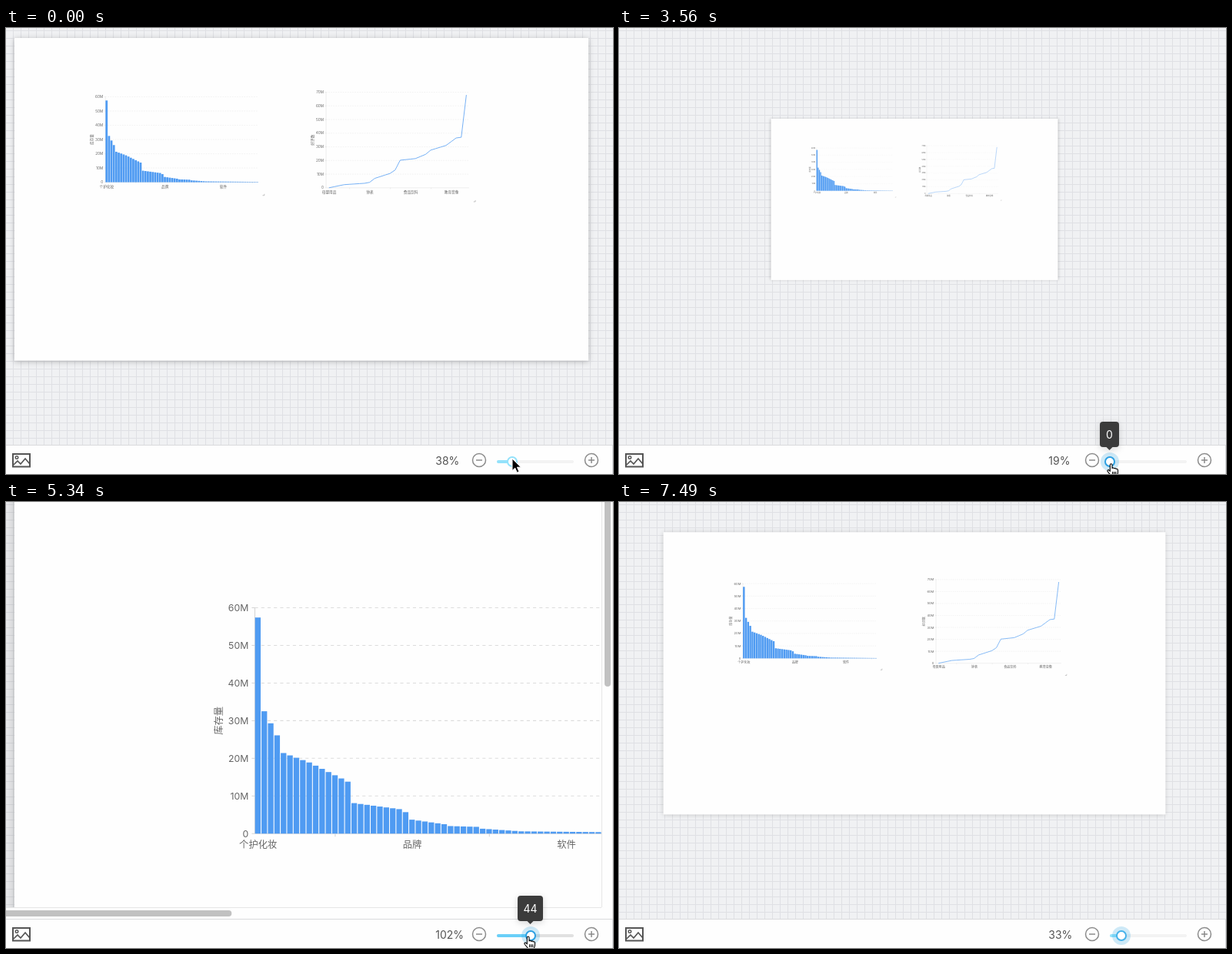
Write an HTML page that moves like this. It is 789 by 580 pixels and loops after 8000 ms.

```html
<!DOCTYPE html>
<html lang="zh">
<head>
<meta charset="utf-8">
<title>Canvas zoom</title>
<style>
html, body { margin: 0; width: 100%; height: 100%; overflow: hidden; background: #fff; }
body { font-family: Inter, "Noto Sans CJK SC", "Noto Sans CJK", sans-serif; }
#stage { position: relative; width: 789px; height: 580px; overflow: hidden; background: #fefefe; }
#view {
  position: absolute; left: 0; top: 0; width: 789px; height: 542px; overflow: hidden;
  background-color: #f0f1f3;
  background-image: linear-gradient(90deg, #dfe0e4 1px, transparent 1px), linear-gradient(#dfe0e4 1px, transparent 1px);
  background-size: 10px 10px; background-position: 9px 3px;
}
#page {
  position: absolute; left: 0; top: 0; width: 1920px; height: 1080px;
  transform-origin: 0 0; background: #fefefe; box-shadow: 0 3px 18px rgba(0, 0, 0, .24);
}
#page svg, #ui { position: absolute; left: 0; top: 0; }
#page text { font-size: 12px; fill: #666; }
.grid { stroke: #dcdcdc; stroke-dasharray: 4 4; }
.axis { stroke: #d4d4d4; }
#ui text { font-size: 14px; }
#tip { filter: drop-shadow(0 2px 4px rgba(0, 0, 0, .16)); }
</style>
</head>
<body>
<div id="stage">
  <div id="view">
    <div id="page"><svg id="charts" width="1920" height="1080"></svg></div>
  </div>
  <svg id="ui" width="789" height="580">
    <g id="vbar">
      <path d="M774 0h15v542h-15z" fill="#fefefe"/>
      <path d="M774.5 0V527M788.5 0V542" stroke="#e6e6e6"/>
      <rect id="vthumb" x="778" y="-20" width="8" rx="4" fill="#c1c1c1"/>
    </g>
    <g id="hbar">
      <path d="M0 527h789v15h-789z" fill="#fefefe"/>
      <path d="M0 527.5H774M788.5 527V542" stroke="#e6e6e6"/>
      <rect id="hthumb" x="-20" y="531" height="8" rx="4" fill="#c1c1c1"/>
    </g>
    <path d="M0 542h789v38H0z" fill="#fefefe"/>
    <path d="M0 542.5H789M788.5 542V580" stroke="#d9dadc"/>
    <g fill="none" stroke="#555" stroke-width="2">
      <path d="M9 554h22v16.5H9z"/>
      <path d="M10 568l5-5 4 4 6-7 6 7" stroke-width="1.7"/>
      <circle cx="14" cy="558.5" r="1.8" stroke-width="1.4"/>
    </g>
    <text id="percent" x="558.3" y="568" fill="#555"></text>
    <g fill="none" stroke="#8b8b8b" stroke-width="1.5">
      <circle cx="615" cy="562" r="8.5"/><path d="M611 562h8"/>
      <circle cx="761" cy="562" r="8.5"/><path d="M757 562h8M761 558v8"/>
    </g>
    <rect id="rail" x="638" y="562" width="100" height="4" rx="2"/>
    <rect id="track" x="638" y="562" height="4" rx="2"/>
    <g id="handle">
      <circle id="halo" r="12" fill="#1ea0e0" fill-opacity=".22"/>
      <circle id="knob" r="6" fill="#fff" stroke-width="2"/>
    </g>
    <g id="tip">
      <rect id="tipBox" y="512" height="33" rx="4" fill="#3b3b3b"/>
      <path d="M-4 545h8l-4 4z" fill="#3b3b3b"/>
      <text id="tipText" y="534" fill="#fff" text-anchor="middle"></text>
    </g>
    <path id="arrow" d="M0 0V15.5L3.7 12.2 6.3 18.2 9 17 6.4 11.2H11.4Z" fill="#000" stroke="#fff"/>
    <g id="hand" stroke="#000" stroke-width="1.1" stroke-linejoin="round">
      <path fill="#fff" d="M4.3 10.5V2.2C4.3.2 7 .2 7 2.2V6.6C7.4 5.6 9.4 5.7 9.6 7 10.2 6.1 11.9 6.5 12.1 7.7 12.8 7.1 14.5 7.4 14.5 9V12C14.5 14 13.3 14.6 13.2 17.5H6C5.4 15.4 3.3 13.6 1.3 10.9 0 9 2.2 8 3.2 9.3Z"/>
      <path fill="none" d="M7.6 11v3.6M9.7 11v3.6M11.8 11v3.6"/>
    </g>
  </svg>
</div>
<script>
const $ = id => document.getElementById(id);
const set = (id, attrs) => { for (const k in attrs) $(id).setAttribute(k, attrs[k]); };
const show = (id, on) => { $(id).style.display = on ? '' : 'none'; };

// Straight lines between [x, y] key points, flat outside them
function along(keys, x) {
  const i = keys.findIndex(k => k[0] >= x);
  if (i < 1) return keys.at(i)[1];
  const [x0, y0] = keys[i - 1], [x1, y1] = keys[i];
  return y0 + (y1 - y0) * (x - x0) / (x1 - x0);
}
const series = (n, keys) => Array.from({ length: n }, (_, i) => along(keys, i));

// Charts, in page units
const line = (cls, x1, y1, x2, y2) => `<path class="${cls}" d="M${x1} ${y1}L${x2} ${y2}"/>`;
const label = (s, x, y, anchor, extra = '') =>
  `<text x="${x}" y="${y}" text-anchor="${anchor}" ${extra}>${s}</text>`;

function frame({ x, right, y0, step, rows, title, titleX, names, first, gap, corner }) {
  let out = '';
  for (let i = 0; i <= rows; i++) {
    const y = y0 - i * step;
    if (i) out += line('grid', x, y, right, y);
    out += line('axis', x - 4, y, x, y) + label(i ? i * 10 + 'M' : '0', x - 8, y + 4.3, 'end');
  }
  out += line('axis', x, y0, x, y0 - rows * step) + line('axis', x, y0, right, y0);
  names.forEach((name, i) => {
    const cx = first + i * gap, tick = cx + gap / 2;
    out += label(name, cx, y0 + 18.5, 'middle');
    if (tick < right) out += line('axis', tick, y0, tick, y0 + 4);
  });
  const ty = y0 - rows * step / 2;
  out += label(title, titleX, ty + 4.4, 'middle', `transform="rotate(-90 ${titleX} ${ty})"`);
  const [cx, cy] = corner;
  return out + `<path d="M${cx} ${cy}v5h-6" fill="none" stroke="#999" stroke-width="1.5"/>`;
}

const stock = series(63, [[0, 57.4], [1, 32.5], [3, 26.1], [4, 21.4], [8, 18.9], [14, 13.8], [15, 8.1],
  [22, 6.5], [23, 5.7], [24, 3.7], [29, 2.5], [30, 2], [34, 1.8], [35, 1.3], [41, .6], [62, .25]]);
const praise = series(28, [[0, 0], [3, 2.3], [7, 3.3], [8, 4], [9, 6.9], [12, 10.5], [13, 13], [14, 20.2],
  [17, 21.4], [19, 24.5], [20, 27.6], [23, 31], [25, 36.5], [26, 37], [27, 68]]);

const pitch = 8.13;
const bars = stock.map((v, i) => {
  const h = v * 4.767;
  return `<rect x="${304.5 + i * pitch}" y="${482.8 - h}" width="7.1" height="${h}"/>`;
}).join('');
const points = praise.map((v, i) => `${1052 + i * 17.03},${501.4 - v * 4.57}`).join(' ');

$('charts').innerHTML =
  frame({ x: 304.3, right: 815.5, y0: 482.8, step: 47.67, rows: 6, title: '库存量', titleX: 258.7,
    names: ['个护化妆', '品牌', '软件'], first: 308.4, gap: 24 * pitch, corner: [836, 522] }) +
  `<g fill="#4f9bf2">${bars}</g>` +
  frame({ x: 1042.5, right: 1521, y0: 501.4, step: 45.7, rows: 7, title: '好评数', titleX: 997.5,
    names: ['母婴用品', '钟表', '食品饮料', '教育音像'], first: 1053, gap: 136.4, corner: [1542, 543] }) +
  `<polyline points="${points}" fill="none" stroke="#4f9bf2" stroke-width="2" stroke-linejoin="round"/>`;

// Motion, by tick: hover at 3, drag from 4, release at 21
const slider = [[3, 20], [4, 19], [8, 0], [10, 0], [13, 40], [15, 44], [16, 43], [19, 15]];
const growth = [[10, .1943], [12, .226], [13, .3947], [14, .888], [15, 1.027], [16, 1], [17, 1], [18, .389], [20, .34]];
const pan = [[13, 1], [14, .22], [15, 0]];
const handX = [[7, -9], [8, -28], [10, -4], [13, -7], [15, -9]];
const handY = [[4, 562], [10, 566], [13, 563.5], [19, 566]];

const percent = v => Math.floor(along([[0, 19.3], [20, 38.7], [40, 89.3], [44, 102.7]], v));
const shrink = k => .3885 - .1942 * Math.max(0, (k - 3) / 5) ** 2.85;

function drawPage(k) {
  const scale = k < 9 ? shrink(k) : along(growth, k);
  const scrolled = k >= 13 && k < 18;
  const u = along(pan, k);
  const left = scrolled ? 11 + 115 * u : 384 - 960 * scale;
  const top = scrolled ? -64.6 + 121.6 * u : 222.8 - 540 * scale;
  $('page').style.transform = `translate(${left}px, ${top}px) scale(${scale})`;

  show('hbar', scrolled);
  show('vbar', scrolled || k === 12);
  set('hthumb', { width: 20 + 774 ** 2 / (left + 1978 * scale) });
  set('vthumb', { height: 20 + 528 ** 2 / (1009 + 149 * scale) });
}

function drawSlider(k, value) {
  const focus = k >= 4, held = k < 21;
  const hover = k >= 3 && k < 8 || k >= 11 && held;
  const x = 638 + value;
  const tint = hover ? '#69cff8' : '#93e2fb';
  $('percent').textContent = percent(value) + '%';
  set('rail', { fill: hover ? '#e1e1e1' : '#f3f3f3' });
  set('track', { width: value, fill: tint });
  set('handle', { transform: `translate(${x} 564)` });
  set('knob', { stroke: focus ? (held ? '#2a9fe2' : '#45b2ea') : tint });
  show('halo', focus);

  const width = value > 9 ? 33 : 25;
  show('tip', focus && held);
  set('tip', { transform: `translate(${x - .5} 0)` });
  set('tipBox', { x: -width / 2, width });
  $('tipText').textContent = value;
}

function drawPointer(k, value) {
  show('arrow', k < 3);
  show('hand', k >= 3 && k < 21);
  set('arrow', { transform: `translate(${658 - 2 * k * k} ${560 + 3.5 * k})` });
  set('hand', { transform: `translate(${638 + value + along(handX, k)} ${along(handY, k)})` });
}

const start = performance.now();
let shown;
function tick() {
  const t = (performance.now() - start) % 8000;
  const k = Math.min(21, Math.floor((t + 12) / 356.5));
  if (k !== shown) {
    const value = Math.round(along(slider, k));
    drawPage(k);
    drawSlider(k, value);
    drawPointer(k, value);
    shown = k;
  }
  requestAnimationFrame(tick);
}
tick();
</script>
</body>
</html>
```
